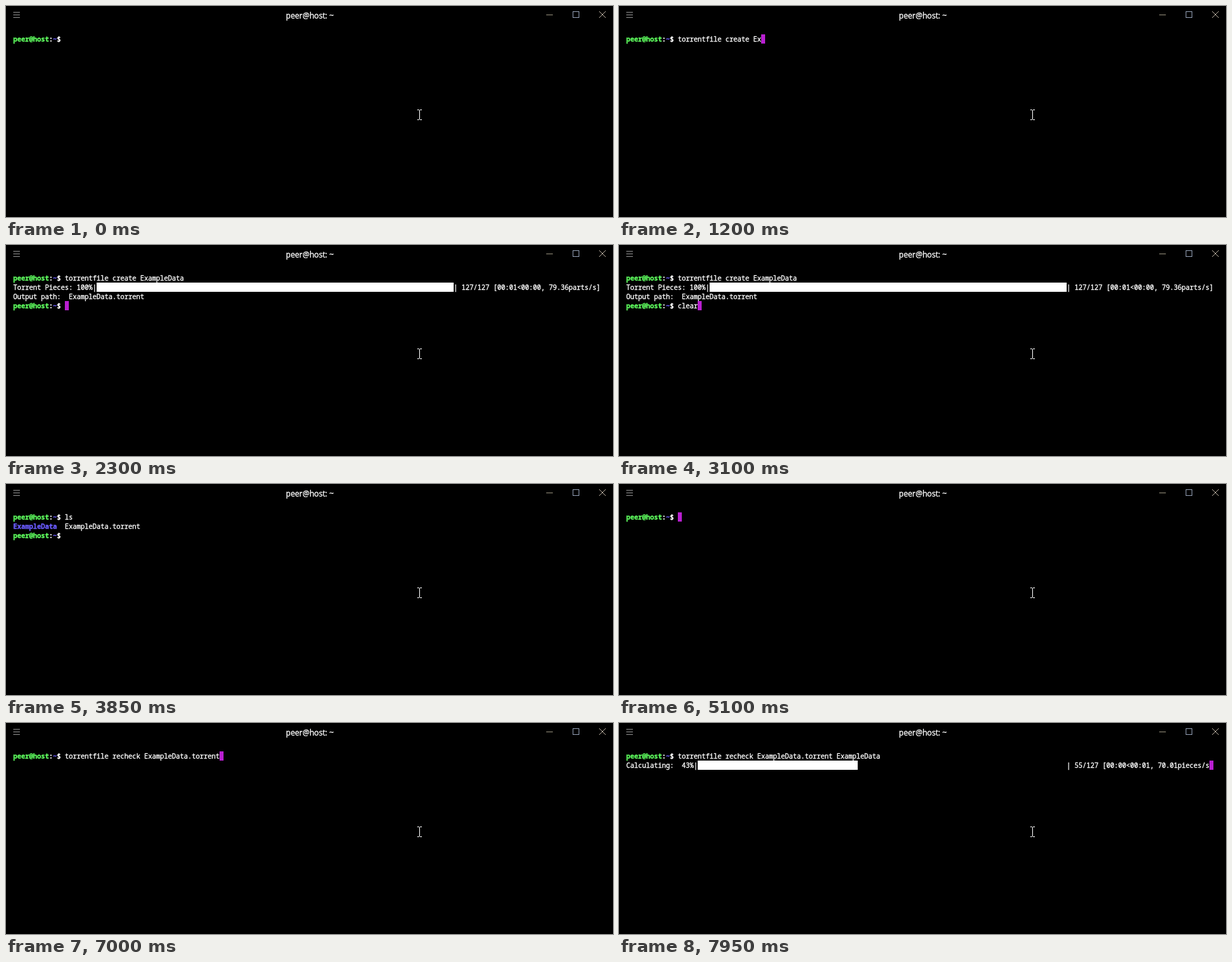
An HTML page with a canvas for the animation above (8000 ms loop, 918 by 320 pixels).

```html
<!DOCTYPE html>
<html lang="en">
<head>
<meta charset="utf-8">
<title>Terminal</title>
<style>
html, body { margin: 0; width: 100%; height: 100%; overflow: hidden; background: #000; }
canvas { display: block; }
</style>
</head>
<body>
<canvas id="stage" width="918" height="320"></canvas>
<script>
const ctx = document.getElementById('stage').getContext('2d');
const LOOP = 8000, TICK = 50;
const LEFT = 11, TOP = 43, CELL = 6, ROW = 14, COLS = 148;
const WHITE = '#fff', GREEN = '#5fff5f', BLUE = '#6a5cff', PURPLE = '#b81fd0';
const MONO = '10px "Noto Sans Mono", "DejaVu Sans Mono", monospace';
const PROMPT_COLS = 13;
const CREATE = 'torrentfile create ExampleData';
const RECHECK = 'torrentfile recheck ExampleData.torrent ExampleData';

// Linear value through [time, value] keys; zero before the first key.
function along(keys, t) {
  if (t < keys[0][0]) return 0;
  for (let i = 1; i < keys.length; i++) {
    const [t0, a] = keys[i - 1], [t1, b] = keys[i];
    if (t < t1) return Math.floor(a + (b - a) * (t - t0) / (t1 - t0) + 1e-6);
  }
  return keys[keys.length - 1][1];
}

function rect(x, y, w, h, color) {
  ctx.fillStyle = color;
  ctx.fillRect(x, y, w, h);
}

// Fill plus a hairline stroke gives the heavy, bright screen text.
function write(text, x, y, font, color) {
  ctx.font = font;
  ctx.fillStyle = ctx.strokeStyle = color;
  ctx.lineWidth = 0.35;
  ctx.lineJoin = 'round';
  ctx.fillText(text, x, y);
  ctx.strokeText(text, x, y);
}

function print(row, col, text, color = WHITE, bold = false) {
  write(text, LEFT + col * CELL, TOP + row * ROW + 11, (bold ? 'bold ' : '') + MONO, color);
}

function cursor(row, col) {
  rect(LEFT + col * CELL, TOP + row * ROW, CELL, ROW, PURPLE);
}

function prompt(row, text = '', showCursor = false) {
  print(row, 0, 'peer@host', GREEN, true);
  print(row, 9, ':', WHITE, true);
  print(row, 10, '~', BLUE, true);
  print(row, 11, '$', WHITE, true);
  print(row, PROMPT_COLS, text);
  if (showCursor) cursor(row, PROMPT_COLS + text.length);
}

const clock = s => '00:' + String(Math.floor(s)).padStart(2, '0');

function progress(row, label, n, rate, unit) {
  const total = 127;
  const head = `${label}: ${String(Math.floor(100 * n / total)).padStart(3)}%|`;
  const times = n ? `${clock(n / rate)}<${clock((total - n) / rate)}, ${rate.toFixed(2)}`
                  : '00:00<?, ?';
  const tail = `| ${n}/${total} [${times}${unit}/s]`;
  const width = COLS - head.length - tail.length;
  const fill = Math.floor(width * 8 * n / total) / 8;
  print(row, 0, head);
  print(row, COLS - tail.length, tail);
  rect(LEFT + head.length * CELL, TOP + row * ROW, Math.round(fill * CELL), ROW, WHITE);
}

function createScene(t) {
  const n = along([[300, 1], [1100, 19], [1200, 21], [1250, 21], [1550, 30]], t);
  prompt(0, CREATE.slice(0, n), t >= 150 && t < 1750);
  if (t < 1750) return;
  if (t >= 1800) {
    const done = along([[1800, 0], [2000, 51], [2200, 127]], t);
    progress(1, 'Torrent Pieces', done, 79.14 + 0.22 * (done - 51) / 76, 'parts');
  }
  if (t < 2300) return cursor(1, t < 1800 ? 0 : COLS - 1);
  print(2, 0, 'Output path:  ExampleData.torrent');
  const typed = along([[2850, 1], [3100, 5]], t);
  prompt(3, 'clear'.slice(0, typed), t < 2500 || t >= 2650);
}

function listScene(t) {
  const n = along([[3450, 1], [3500, 2]], t);
  prompt(0, 'ls'.slice(0, n), t < 3400 || (t >= 3450 && t < 3700));
  if (t < 3700) return;
  print(1, 0, 'ExampleData', BLUE, true);
  print(1, 13, 'ExampleData.torrent');
  const typed = along([[4600, 1], [4950, 5]], t);
  const hidden = (t >= 3850 && t < 4050) || (t >= 4200 && t < 4400);
  prompt(2, 'clear'.slice(0, typed), !hidden);
}

function recheckScene(t) {
  const n = along([[5250, 1], [6000, 17], [6050, 17], [6100, 18], [6900, 38],
                   [6950, 38], [7000, 39], [7500, 51]], t);
  prompt(0, RECHECK.slice(0, n), t < 7700);
  if (t < 7700) return;
  if (t >= 7750) {
    const done = along([[7750, 0], [7800, 0], [7950, 55]], t);
    progress(1, 'Calculating', done, 70.01 + 0.03 * (done - 55), 'pieces');
  }
  cursor(1, t < 7750 ? 0 : COLS - 1);
}

function line(color, ...points) {
  ctx.strokeStyle = color;
  ctx.lineWidth = 1;
  ctx.beginPath();
  points.forEach(([x, y]) => ctx.lineTo(x, y));
  ctx.stroke();
}

function windowFrame() {
  ctx.textAlign = 'center';
  write('peer@host: ~', 459.5, 19, '11.7px "Open Sans", "Noto Sans", sans-serif', WHITE);
  ctx.textAlign = 'left';
  for (const y of [9, 13, 17]) rect(11, y, 10, 1, '#8c8c8c');
  rect(817, 13, 10, 1, '#96907c');
  ctx.strokeStyle = '#8f9bb0';
  ctx.lineWidth = 1;
  ctx.lineJoin = 'miter';
  ctx.strokeRect(857.5, 8.5, 9, 9);
  line('#b5aa9c', [897, 8], [907, 18]);
  line('#b5aa9c', [907, 8], [897, 18]);
}

function pointer() {
  rect(625, 158, 1, 14, WHITE);
  for (const y of [157, 172]) {
    rect(622, y, 3, 1, WHITE);
    rect(626, y, 3, 1, WHITE);
  }
}

function draw() {
  const t = Math.floor(performance.now() % LOOP / TICK) * TICK;
  rect(0, 0, 918, 320, '#000');
  windowFrame();
  (t < 3250 ? createScene : t < 5100 ? listScene : recheckScene)(t);
  pointer();
  requestAnimationFrame(draw);
}
draw();
</script>
</body>
</html>
```
